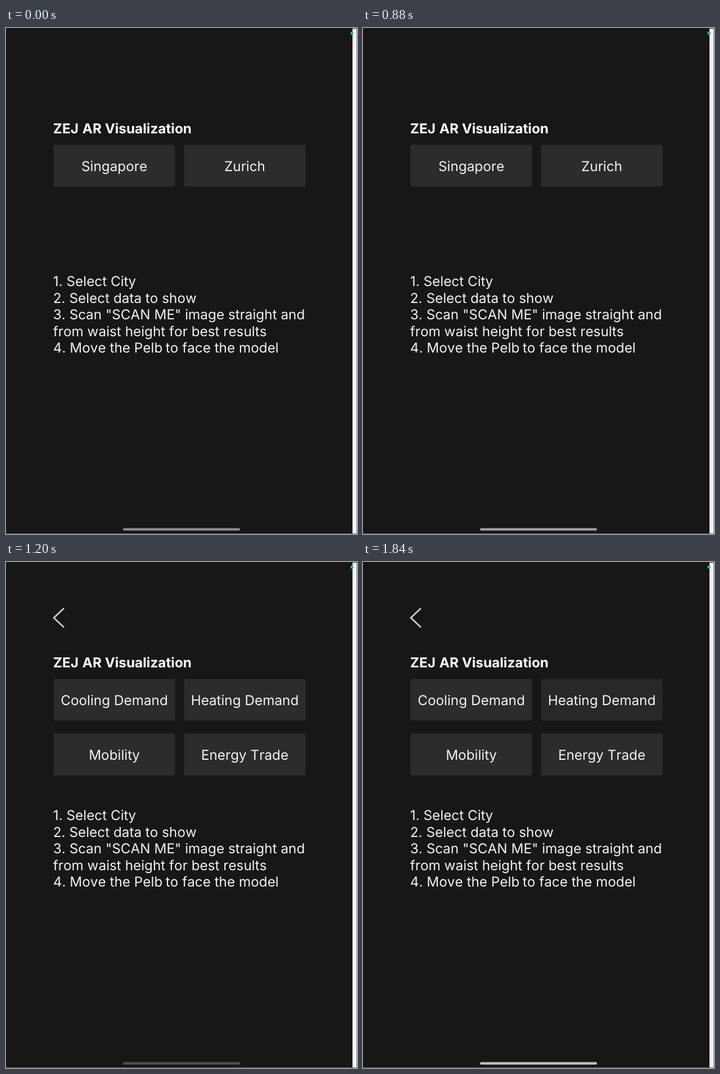
Recreate the animation shown at these times as an HTML page. Size 624 px wide and 898 px high, loop 1.92 s.

```html
<!DOCTYPE html>
<html lang="en">
<head>
<meta charset="utf-8">
<title>City visualization menu</title>
<style>
  html, body { margin: 0; width: 100%; height: 100%; overflow: hidden; background: #171717; }
  svg { display: block; width: 624px; height: 898px; }
  text {
    font: 400 24.3px Inter, "Open Sans", sans-serif;
    font-optical-sizing: none;
    font-variation-settings: "opsz" 14;
    font-kerning: none;
    text-rendering: geometricPrecision;
    fill: #f2f2f2;
  }
  .title { font-weight: 700; fill: #fff; }
  .label { text-anchor: middle; }
</style>
</head>
<body>
<svg id="stage" viewBox="0 0 624 898" xmlns="http://www.w3.org/2000/svg">
  <rect width="624" height="898" fill="#171717"/>
  <rect y="897" width="624" height="1" fill="#707070"/>
  <rect x="616" y="1" width="7.5" height="896" fill="#f4f4f4"/>
  <circle cx="615.2" cy="9" r="2.8" fill="#30c758"/>
  <text class="title" x="83.8" y="186.8">ZEJ <tspan x="135.8">AR Visualization</tspan></text>
  <g id="cities"></g>
  <g id="data">
    <path d="M103 82 L85 99 L103 116" fill="none" stroke="#cfcfcf" stroke-width="2.7"/>
  </g>
  <g id="steps"></g>
  <rect id="indicator" x="208" y="887.5" width="208" height="4.5" rx="2.25"/>
</svg>
<script>
const LOOP = 1920, TICK = 80, SWITCH = 1200;
const byId = id => document.getElementById(id);
const gray = v => `rgb(${[v, v, v].map(Math.round)})`;

function add(parent, tag, attrs, text = "") {
  const node = document.createElementNS("http://www.w3.org/2000/svg", tag);
  for (const key in attrs) node.setAttribute(key, attrs[key]);
  node.textContent = text;
  parent.appendChild(node);
  return node;
}

function addButton(parent, col, row, label) {
  const x = 84.5 + col * 232, y = 207.5 + row * 97;
  const box = add(parent, "rect", { x, y, width: 216, height: 74, rx: 2, fill: gray(44) });
  add(parent, "text", { class: "label", x: x + 108, y: y + 46 }, label);
  return box;
}

const cities = byId("cities"), data = byId("data"), steps = byId("steps");
addButton(cities, 0, 0, "Singapore");
const zurich = addButton(cities, 1, 0, "Zurich");
addButton(data, 0, 0, "Cooling Demand");
const heating = addButton(data, 1, 0, "Heating Demand");
addButton(data, 0, 1, "Mobility");
addButton(data, 1, 1, "Energy Trade");

const addStep = (row, text) => add(steps, "text", { x: 83.8, y: 458.4 + row * 29.45 }, text);
addStep(0, "1. Select City");
addStep(1, "2. Select data to show");
addStep(2, "3. Scan \"SCAN ME\" image straight and");
addStep(3, "from waist height for best results");
add(addStep(4, "4. Move the Pelb "), "tspan", { x: 283.8 }, "to face the model");

// Each track is a list of [time, gray level], linear in between.
const indicatorTrack = [[0, 138], [400, 154], [880, 156], [1120, 98], [1200, 80], [1360, 76], [1600, 76], [1680, 80], [1840, 190]];
const zurichTrack = [[960, 44], [1120, 31]];
const heatingTrack = [[1200, 44], [1360, 40]];

function level(track, t) {
  const next = track.findIndex(([time]) => time > t);
  if (next === 0) return track[0][1];
  if (next < 0) return track[track.length - 1][1];
  const [t0, v0] = track[next - 1], [t1, v1] = track[next];
  return v0 + (v1 - v0) * (t - t0) / (t1 - t0);
}

function draw(time) {
  const t = Math.floor((time % LOOP) / TICK) * TICK;
  const chosen = t >= SWITCH;
  cities.style.display = chosen ? "none" : "";
  data.style.display = chosen ? "" : "none";
  zurich.setAttribute("fill", gray(level(zurichTrack, t)));
  heating.setAttribute("fill", gray(level(heatingTrack, t)));
  byId("indicator").setAttribute("fill", gray(level(indicatorTrack, t)));
}

const start = performance.now();
function loop() {
  draw(performance.now() - start);
  requestAnimationFrame(loop);
}
loop();
</script>
</body>
</html>
```
